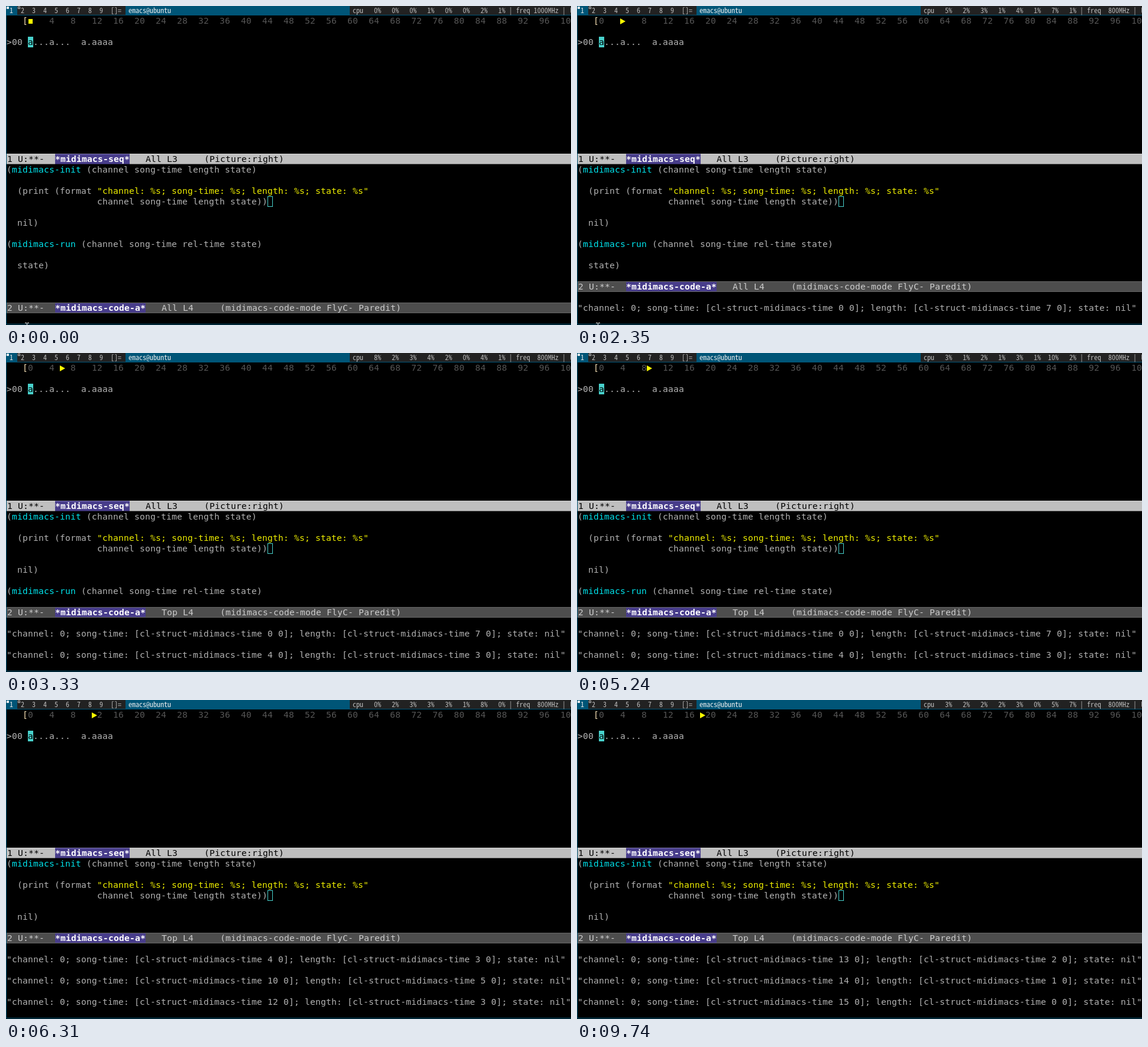
An HTML page with a canvas for the animation above (9.84 s loop, 955 by 540 pixels).

```html
<!DOCTYPE html>
<html lang="en">
<head>
<meta charset="utf-8">
<title>midimacs</title>
<style>
html, body { margin: 0; width: 100%; height: 100%; overflow: hidden; background: #000; }
canvas { display: block; }
</style>
</head>
<body>
<canvas id="stage" width="955" height="540"></canvas>
<script>
const ctx = document.getElementById('stage').getContext('2d');
const LOOP = 9840, WIDTH = 955, TOP = 16, CELL = 9, ROW = 18, BOTTOM = 538;
const FG = '#b2b2b2', YELLOW = '#ffff00', STRING = '#eeee00', CYAN = '#00e5ee', TURQUOISE = '#48d1cc';
const BLUE = '#005577', BAR = '#222222', BAR_FG = '#bbbbbb', BAR_BRIGHT = '#eeeeee';
const POINTER_GONE = 2430;

// Each list is [start time, value], in order of time.
const BEATS = [350, 860, 1350, 1850, 2350, 2840, 3330, 3830, 4330, 4830, 5320, 5820,
  6310, 6810, 7300, 7760, 8250, 8750, 9240, 9740];
const MESSAGES = [[400, 0], [2390, 4], [5320, 10], [6310, 12], [6810, 13], [7300, 14], [7800, 15]];
const STATUS = [
  [0, '0 0 0 1 0 0 2 1'], [300, '6 2 3 2 1 3 5 2'], [1310, '4 1 3 2 2 0 6 2'],
  [2310, '5 2 3 1 4 1 7 1'], [3290, '8 2 3 4 2 0 4 1'], [4290, '5 1 2 3 1 2 6 1'],
  [5240, '3 1 2 1 3 1 10 2'], [6230, '0 2 3 3 3 1 8 0'], [7220, '2 1 3 4 9 1 6 0'],
  [8210, '2 1 3 3 2 1 7 3'], [9200, '3 2 2 2 3 0 5 7']
];

// Whole-pixel size at which a monospaced family fills a cell of the given width.
function fontFor(family, cell) {
  ctx.font = `100px ${family}`;
  return `${Math.round(100 * cell / ctx.measureText('0').width)}px ${family}`;
}
const EDITOR_FONT = '11pt "DejaVu Sans Mono", monospace';
const BAR_FONT = fontFor('"Noto Sans Mono CJK JP", "DejaVu Sans Mono", monospace', 6);

const rowY = row => TOP + row * ROW;
const colX = col => 1 + col * CELL;

function rect(x, y, w, h, color) {
  ctx.fillStyle = color;
  ctx.fillRect(x, y, w, h);
}

function outline(x, y, w, h, color) {
  ctx.strokeStyle = color;
  ctx.lineWidth = 1;
  ctx.strokeRect(x + 0.5, y + 0.5, w - 1, h - 1);
}

function cells(string, x, baseline, step, color, font) {
  ctx.font = font;
  ctx.fillStyle = color;
  [...string].forEach((char, i) => {
    if (char !== ' ') ctx.fillText(char, x + i * step, baseline);
  });
}

const barText = (string, x, color = BAR_FG) => cells(string, x, 12, 6, color, BAR_FONT);
const text = (string, col, row, color = FG) =>
  cells(string, colX(col), rowY(row) + 14, CELL, color, EDITOR_FONT);

function drawBar(time) {
  rect(0, 0, WIDTH, 15, BAR);
  rect(0, 0, 19, 15, BLUE);
  rect(202, 0, 379, 15, BLUE);
  for (let tag = 1; tag <= 9; tag++) {
    barText(String(tag), tag * 19 - 13, tag === 1 ? BAR_BRIGHT : BAR_FG);
  }
  rect(1, 1, 4, 4, BAR_BRIGHT);
  outline(20, 1, 4, 4, BAR_FG);
  barText('[]=', 177);
  barText('emacs@ubuntu', 207, BAR_BRIGHT);

  const loads = STATUS.filter(([start]) => start <= time).pop()[1].split(' ');
  const usage = loads.map(load => load.padStart(3) + '%').join(' ');
  const freq = time < 1310 ? '1000' : ' 800';
  barText(`cpu ${usage} | freq ${freq}MHz | l`, 586);
}

function drawSequence(time) {
  text('[', 3, 0, '#f5deb3');
  for (let beat = 0; beat <= 100; beat += 4) text(String(beat), 4 + beat, 0, '#555555');

  const beat = BEATS.filter(start => start <= time).length - 1;
  const x = colX(4 + Math.max(beat, 0));
  rect(x, TOP, CELL, ROW, '#000');
  if (beat < 0) {
    rect(x + 1, 22, 7, 8, YELLOW);
  } else {
    ctx.fillStyle = YELLOW;
    ctx.beginPath();
    ctx.moveTo(x, 21);
    ctx.lineTo(x + CELL, 26);
    ctx.lineTo(x, 31);
    ctx.fill();
  }

  text('>00 a...a...  a.aaaa', 0, 2);
  rect(colX(4), rowY(2), CELL, ROW, TURQUOISE);
  text('a', 4, 2, '#000');
}

function drawCode() {
  const define = (name, args, row) => {
    text('(', 0, row);
    text(name, 1, row, CYAN);
    text(args, name.length + 2, row);
  };
  define('midimacs-init', '(channel song-time length state)', 14);
  text('(print (format', 2, 16);
  text('"channel: %s; song-time: %s; length: %s; state: %s"', 17, 16, STRING);
  text('channel song-time length state))', 17, 17);
  outline(colX(49), rowY(17), CELL, ROW, TURQUOISE);
  text('nil)', 2, 19);
  define('midimacs-run', '(channel song-time rel-time state)', 21);
  text('state)', 2, 23);
}

function drawModeLine(row, number, buffer, info, active) {
  const y = rowY(row), x = 2;
  const fg = active ? '#000' : '#cccccc';
  const put = (string, col, color, font = EDITOR_FONT) =>
    cells(string, x + col * CELL, y + 14, CELL, color, font);
  rect(1, y, WIDTH, ROW, active ? '#bfbfbf' : '#4d4d4d');
  rect(x + 9 * CELL, y, buffer.length * CELL, ROW, '#483d8b');
  put(`${number} U:**-`, 0, fg);
  put(buffer, 9, '#fff', 'bold ' + EDITOR_FONT);
  put(info, 12 + buffer.length, fg);
  if (active) {
    rect(1, y, WIDTH, 1, 'rgba(255, 255, 255, 0.3)');
    rect(1, y + ROW - 1, WIDTH, 1, 'rgba(0, 0, 0, 0.4)');
  } else {
    outline(1, y, WIDTH, ROW, '#666666');
  }
}

function drawEchoArea(time) {
  const shown = MESSAGES.filter(([start]) => start <= time).slice(-3);
  const lines = shown.length;
  const modeRow = 27 - 2 * lines;
  rect(1, rowY(modeRow), WIDTH, BOTTOM - rowY(modeRow), '#000');
  drawModeLine(modeRow, 2, '*midimacs-code-a*',
    `${lines < 2 ? 'All' : 'Top'} L4     (midimacs-code-mode FlyC- Paredit)`, false);

  shown.forEach(([, beat], i) => {
    const length = (beat < 8 ? 7 : 15) - beat;
    const struct = value => `[cl-struct-midimacs-time ${value} 0]`;
    text(`"channel: 0; song-time: ${struct(beat)}; length: ${struct(length)}; state: nil"`,
      0, modeRow + 2 + 2 * i);
  });
}

function drawPointer() {
  rect(32, 536, 3, 1, '#fff');
  rect(36, 536, 3, 1, '#fff');
  rect(35, 537, 1, 3, '#fff');
}

function draw(time) {
  rect(0, 0, WIDTH, 540, '#000');
  rect(0, 15, WIDTH, BOTTOM - 14, BLUE);
  rect(1, TOP, WIDTH, BOTTOM - TOP, '#000');
  drawBar(time);
  drawSequence(time);
  drawModeLine(13, 1, '*midimacs-seq*', 'All L3     (Picture:right)', true);
  drawCode();
  drawEchoArea(time);
  if (time < POINTER_GONE) drawPointer();
}

const begin = performance.now();
function tick() {
  draw((performance.now() - begin) % LOOP);
  requestAnimationFrame(tick);
}
tick();
</script>
</body>
</html>
```
